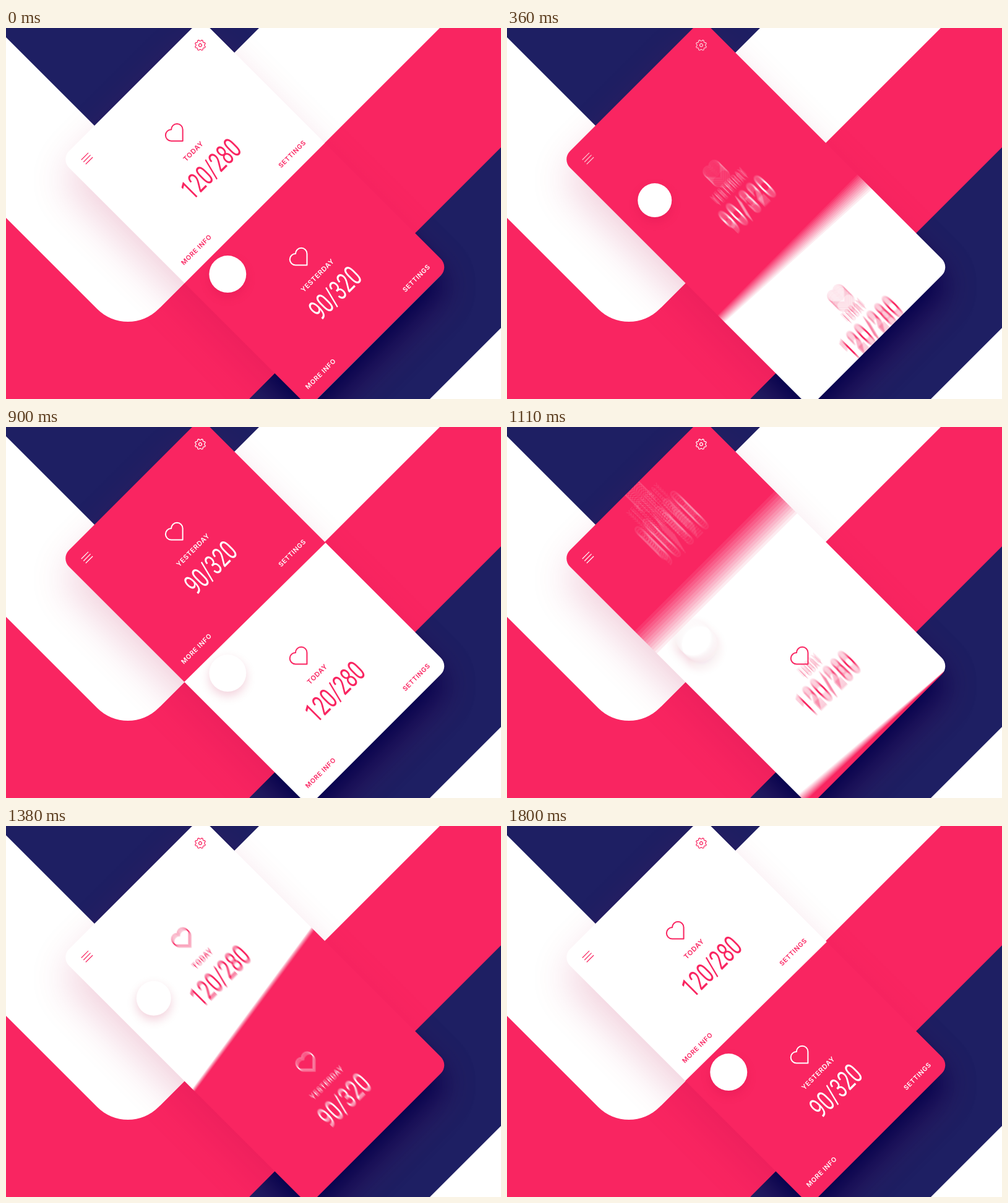
An HTML page with a canvas that plays this animation: 800 by 600 pixels, repeating every 1.83 s.

```html
<!DOCTYPE html>
<html lang="en">
<head>
<meta charset="utf-8">
<title>Heart rate cards</title>
<style>
  html, body { margin: 0; width: 100%; height: 100%; overflow: hidden; background: #fff; }
  canvas { display: block; width: 800px; height: 600px; }
</style>
</head>
<body>
<canvas id="stage" width="800" height="600"></canvas>
<script>
const W = 800, H = 600;
const LOOP = 1830, HALF = LOOP / 2, STEP = 30;
const SHUTTER = 20, SAMPLES = 12;
const RED = [249, 37, 97], WHITE = [255, 255, 255], NAVY = '#1e1f63';
const CARD = { x: 88.5, y: 212.5, w: 320.5, h: 567, r: 18.7 };
const SHIFT = 284, SEAM = 283;
const BAND = 292, FIRST = 409;

const rgb = c => `rgb(${c.map(Math.round).join(',')})`;
const mix = (a, b, p) => a.map((v, i) => v + (b[i] - v) * p);

function smooth(t, from, to) {
  const s = Math.max(0, Math.min(1, (t - from) / (to - from)));
  return s * s * (3 - 2 * s);
}

// Damped spring from 1 to 0; a low damping ratio overshoots more.
function spring(t, start, speed, damping) {
  const a = Math.max(0, t - start) * speed;
  return Math.exp(-damping * a) * (Math.cos(a) + damping * Math.sin(a));
}

// Pose at t ms into one half of the loop.
function pose(t) {
  const slide = SHIFT * spring(t, 158, 0.006, 1.5);
  const lift = smooth(t, 60, 355) - smooth(t, 585, 815);
  const press = smooth(t, 80, 300) - smooth(t, 400, 600);
  const swell = smooth(t, 500, 620) - smooth(t, 680, 830);
  return {
    top: SEAM - 330 * smooth(t, 140, 300),
    left: SEAM + slide,
    right: SEAM + SHIFT * spring(t, 236, 0.0115, 0.65),
    text: slide,
    heart: SHIFT * spring(t, 216, 0.0078, 1.5),
    knobY: 322 - 169 * lift,
    knobR: 30 - 2.5 * press + 1.5 * swell,
    labels: 1 - smooth(t, 20, 150) + smooth(t, 640, 830),
    icons: smooth(t, 190, 440)
  };
}

function layer() {
  const c = document.createElement('canvas');
  c.width = W;
  c.height = H;
  return c.getContext('2d');
}

function polygon(g, points) {
  g.beginPath();
  points.forEach(([x, y]) => g.lineTo(x, y));
  g.closePath();
}

function toCard(g) {
  g.translate(CARD.x, CARD.y);
  g.rotate(-Math.PI / 4);
}

function cardPath(g) {
  g.beginPath();
  g.roundRect(0, 0, CARD.w, CARD.h, CARD.r);
}

// Diagonal stripe that starts where x + y = a.
function stripe(g, a, width = BAND) {
  const b = a + width;
  polygon(g, [[a + 900, -900], [b + 900, -900], [b - 900, 900], [a - 900, 900]]);
}

// The shape itself stays off stage, only its shadow lands on it.
function castShadow(g, color, dy, blur) {
  g.save();
  g.shadowColor = color;
  g.shadowBlur = blur;
  g.shadowOffsetX = 3000;
  g.shadowOffsetY = dy;
  g.translate(-3000, 0);
  toCard(g);
  cardPath(g);
  g.fill();
  g.restore();
}

function paintBackdrop(g) {
  g.fillStyle = NAVY;
  g.fillRect(0, 0, W, H);
  ['#fff', rgb(RED), NAVY, '#fff'].forEach((color, i) => {
    g.fillStyle = color;
    stripe(g, FIRST + i * BAND, 300);
    g.fill();
  });
  // Red corner with a rounded white panel on it.
  g.fillStyle = rgb(RED);
  polygon(g, [[0, 200], [394, 600], [0, 600]]);
  g.fill();
  g.save();
  g.translate(197, 504);
  g.rotate(-Math.PI / 4);
  g.fillStyle = '#fff';
  g.beginPath();
  g.roundRect(0, -800, 206.5, 800, [0, 0, 0, 70]);
  g.fill();
  g.restore();

  castShadow(g, 'rgba(185,10,75,0.19)', 33, 64);
  g.save();
  stripe(g, FIRST + 2 * BAND);
  g.clip();
  castShadow(g, 'rgb(0,0,76)', 28, 46);
  g.restore();
}

function heart(g, x, y) {
  const r = 9.25;
  g.save();
  g.translate(x, y);
  g.rotate(Math.PI / 4);
  g.lineWidth = 2;
  g.lineJoin = 'round';
  g.beginPath();
  g.moveTo(r, r);
  g.arc(-r, 0, r, Math.PI / 2, Math.PI * 1.5);
  g.arc(0, -r, r, Math.PI, 0);
  g.closePath();
  g.stroke();
  g.restore();
}

function label(g, text, x, y, size, align) {
  g.font = `600 ${size}px Inter, "Open Sans", sans-serif`;
  g.letterSpacing = '0.65px';
  g.textAlign = align;
  g.fillText(text, x, y);
}

// Readings are set in a condensed face.
function reading(g, text, x, y) {
  g.save();
  g.translate(x, y);
  g.scale(0.66, 1);
  g.font = '400 46px Roboto, "Open Sans", sans-serif';
  g.letterSpacing = '0px';
  g.textAlign = 'center';
  g.fillText(text, 0, 0);
  g.restore();
}

const today = { fill: WHITE, ink: RED, day: 'TODAY', value: '120/280' };
const yesterday = { fill: RED, ink: WHITE, day: 'YESTERDAY', value: '90/320' };

function content(g, block, heartY, textY) {
  g.fillStyle = g.strokeStyle = rgb(block.ink);
  heart(g, 160.5, 105.2 + heartY);
  label(g, block.day, 160.8, 146 + textY, 11, 'center');
  reading(g, block.value, 160.8, 198.3 + textY);
}

function footer(g, block, y, alpha) {
  g.globalAlpha = alpha;
  g.fillStyle = rgb(block.ink);
  label(g, 'MORE INFO', 19.5, y, 10.5, 'left');
  label(g, 'SETTINGS', 299.5, y, 10.5, 'right');
  g.globalAlpha = 1;
}

function icons(g, color) {
  g.strokeStyle = color;
  g.lineWidth = 1.2;
  g.beginPath();
  for (let y = 24; y <= 34; y += 5) {
    g.moveTo(23, y);
    g.lineTo(39, y);
  }
  g.stroke();

  const cx = 290, cy = 28.8;
  g.beginPath();
  for (let i = 0; i < 96; i++) {
    const a = i / 96 * Math.PI * 2;
    const tooth = Math.max(-1, Math.min(1, -1.6 * Math.cos(8 * a)));
    const r = 7.7 + 0.9 * tooth;
    g.lineTo(cx + r * Math.cos(a), cy + r * Math.sin(a));
  }
  g.closePath();
  g.stroke();
  g.beginPath();
  g.arc(cx, cy, 2.4, 0, Math.PI * 2);
  g.stroke();
}

function fillBelow(g, left, right, color) {
  polygon(g, [[0, left], [CARD.w, right], [CARD.w, 700], [0, 700]]);
  g.fillStyle = rgb(color);
  g.fill();
}

function knob(g, p) {
  g.save();
  toCard(g);
  g.shadowColor = 'rgba(190,0,60,0.18)';
  g.shadowBlur = 16;
  g.shadowOffsetY = 7;
  g.fillStyle = '#fff';
  g.beginPath();
  g.arc(59.5, p.knobY, p.knobR, 0, Math.PI * 2);
  g.fill();
  g.restore();
}

// The leaving block returns at the bottom while the coming one moves to the top.
function paintFace(g, p, early, leaving, coming) {
  g.save();
  toCard(g);
  // Bleed past the outline, so that only the mask shapes the edge.
  g.save();
  g.translate(-4, 0);
  g.scale((CARD.w + 8) / CARD.w, 1);
  fillBelow(g, -20, -20, leaving.fill);
  g.restore();

  const gone = p.top - SEAM;
  if (p.top > 0) content(g, leaving, gone, gone);
  bleed(g, p.top, p.top, coming.fill);
  content(g, coming, p.heart, p.text);
  bleed(g, p.left, p.right, leaving.fill);
  content(g, leaving, SHIFT + p.heart, SHIFT + p.text);

  footer(g, early ? leaving : coming, 262, p.labels);
  footer(g, early ? coming : leaving, 262 + SHIFT, p.labels);
  icons(g, rgb(mix(leaving.ink, coming.ink, p.icons)));
  g.restore();
}

function bleed(g, left, right, color) {
  g.save();
  g.translate(-4, 0);
  g.scale((CARD.w + 8) / CARD.w, 1);
  fillBelow(g, left, right, color);
  g.restore();
}

const stage = document.getElementById('stage').getContext('2d');
const backdrop = layer(), face = layer(), sample = layer();
paintBackdrop(backdrop);

function paintMoment(g, t, leaving, coming) {
  const p = pose(t);
  paintFace(face, p, t < HALF / 2, leaving, coming);
  g.drawImage(backdrop.canvas, 0, 0);
  g.save();
  toCard(g);
  cardPath(g);
  g.clip();
  g.resetTransform();
  g.drawImage(face.canvas, 0, 0);
  g.restore();
  knob(g, p);
}

// Averages several moments around the time to give motion blur.
function render(time) {
  const first = time < HALF;
  const t = first ? time : time - HALF;
  const pair = first ? [today, yesterday] : [yesterday, today];
  for (let k = 0; k < SAMPLES; k++) {
    const offset = ((k + 0.5) / SAMPLES - 0.5) * SHUTTER;
    paintMoment(sample, Math.max(0, Math.min(HALF, t + offset)), ...pair);
    stage.globalAlpha = 1 / (k + 1);
    stage.drawImage(sample.canvas, 0, 0);
  }
}

const start = performance.now();
let shown = -1;
function tick() {
  const time = Math.floor((performance.now() - start) % LOOP / STEP) * STEP;
  if (time !== shown) render(shown = time);
  requestAnimationFrame(tick);
}
tick();
</script>
</body>
</html>
```
